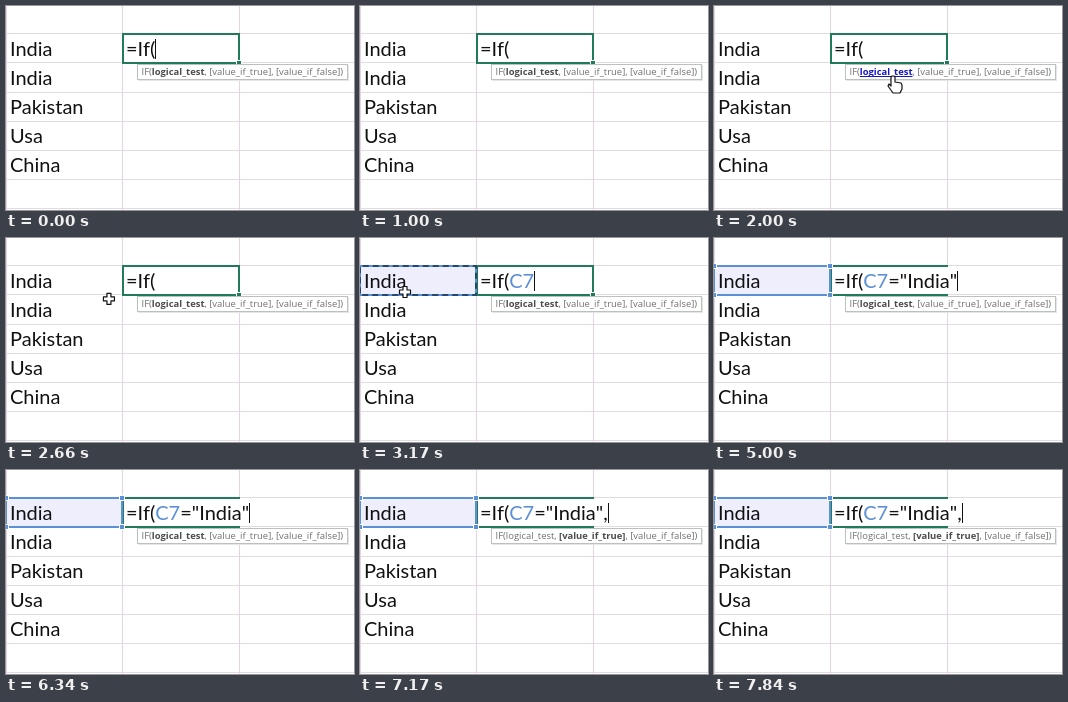
These frames come from a looping animation (348x204 px, 8000 ms). An HTML page with a canvas:

```html
<!DOCTYPE html>
<html>
<head>
<meta charset="utf-8">
<style>
html, body { margin: 0; overflow: hidden; background: #fff; }
canvas { display: block; }
</style>
</head>
<body>
<canvas id="stage" width="348" height="204"></canvas>
<script>
const g = document.getElementById('stage').getContext('2d');
const LOOP = 8000, STEP = 1000 / 6, BLINK = 530;
const CELL = '20px Lato, sans-serif';
const GREEN = '#217a5a', BLUE = '#5b8fd8';
const rows = ['India', 'India', 'Pakistan', 'Usa', 'China'];
const hintArgs = ['logical_test', '[value_if_true]', '[value_if_false]'];

// When each piece of the formula is entered
const typed = [
  [0, '=If('], [3000, 'C7'], [3500, '="'], [3667, 'Ind'],
  [3833, 'ia'], [4833, '"'], [6667, ',']
];
// Pointer path: time, x, y
const path = [[1667, 206, 98], [1900, 178, 70], [2330, 178, 70], [2950, 45, 54], [3480, 45, 54]];

function rect(x, y, w, h, color) {
  g.fillStyle = color;
  g.fillRect(x, y, w, h);
}

function text(str, x, y, font, color) {
  g.font = font;
  g.fillStyle = color;
  g.fillText(str, x, y);
  return x + g.measureText(str).width;
}

function shape(points, x, y) {
  g.beginPath();
  points.forEach(([a, b]) => g.lineTo(x + a, y + b));
  g.closePath();
  g.fillStyle = '#fff';
  g.strokeStyle = '#111';
  g.lineWidth = 1.2;
  g.lineJoin = 'round';
  g.fill();
  g.stroke();
}

function pointerAt(t) {
  for (let i = 1; i < path.length; i++) {
    const [t0, x0, y0] = path[i - 1], [t1, x1, y1] = path[i];
    if (t >= t0 && t < t1) {
      const p = (t - t0) / (t1 - t0), k = p * p * (3 - 2 * p);
      return { x: x0 + (x1 - x0) * k, y: y0 + (y1 - y0) * k };
    }
  }
  return null;
}

function drawGrid() {
  rect(0, 0, 348, 204, '#fff');
  for (let i = 0; i < 7; i++) rect(0, Math.round(27.2 + i * 29.2), 348, 1, '#e2dce2');
  for (const x of [0, 116, 233]) rect(x, 0, 1, 204, '#e6d3e6');
}

function drawReference(t) {
  rect(1, 28, 115, 28, '#eeeefc');
  g.lineWidth = 2;
  g.strokeStyle = BLUE;
  g.strokeRect(0, 28, 116, 29);
  if (t < 3500) {
    g.strokeStyle = '#24476f';
    g.setLineDash([6, 4]);
    g.lineDashOffset = -t / 60;
    g.strokeRect(0, 28, 116, 29);
    g.setLineDash([]);
  } else {
    for (const x of [-2, 114]) {
      for (const y of [26, 55]) {
        rect(x - 1, y - 1, 6, 6, '#fff');
        rect(x, y, 4, 4, BLUE);
      }
    }
  }
}

function drawFormula(t) {
  const entered = typed.filter(([at]) => at <= t + 1);
  g.font = CELL;
  const end = 120 + g.measureText(entered.map(e => e[1]).join('')).width;
  rect(117, 28, Math.max(116, end - 115), 28, '#fff');
  rect(116, 27, 118, 2, GREEN);
  rect(116, 56, 118, 2, GREEN);
  rect(116, 27, 2, 30, GREEN);
  if (end < 228) {
    rect(232, 27, 2, 30, GREEN);
    rect(230, 54, 6, 6, '#fff');
    rect(231, 55, 4, 4, GREEN);
  }
  if (t >= 2999) drawReference(t);
  let x = 120;
  for (const [, part] of entered) x = text(part, x, 50, CELL, part === 'C7' ? BLUE : '#111');
  const last = entered[entered.length - 1][0];
  if (Math.floor((t - last + 1) / BLINK) % 2 === 0) rect(Math.round(x), 33, 1, 20, '#111');
}

function drawHint(t, mouse) {
  const hover = mouse && mouse.x > 146 && mouse.x < 199 && mouse.y > 58 && mouse.y < 74;
  const active = t < 6666 ? 0 : 1;
  const font = bold => (bold ? 'bold ' : '') + '9.45px "Open Sans", sans-serif';
  const pieces = [['IF(']];
  hintArgs.forEach((arg, i) => pieces.push([arg, i === active, hover && i === 0], [i < 2 ? ', ' : ')']));

  const width = pieces.reduce((sum, [str, bold]) => {
    g.font = font(bold);
    return sum + g.measureText(str).width;
  }, 9);
  const w = Math.round(width);
  rect(132, 59, w, 16, '#e6e6e6');
  rect(131, 58, w, 16, '#b8c4b8');
  rect(132, 59, w - 2, 14, '#fff');

  let x = 135.5;
  for (const [str, bold, link] of pieces) {
    const start = x;
    x = text(str, x, 69, font(bold), link ? '#1717c4' : bold ? '#4c4c4c' : '#707070');
    if (link) rect(start, 70, x - start, 1, '#1717c4');
  }
}

function drawPointer({ x, y }) {
  if (x > 131 && x < 344 && y > 58 && y < 74) {
    shape([[0, 0], [2, 0], [3, 1], [3, 6], [9, 7], [10, 9], [10, 13], [8, 17],
      [1, 17], [-4, 10], [-3, 8], [-1, 10], [-1, 1]], x, y);
  } else {
    const a = 2, b = 5.5;
    shape([[-a, -b], [a, -b], [a, -a], [b, -a], [b, a], [a, a], [a, b], [-a, b],
      [-a, a], [-b, a], [-b, -a], [-a, -a]], x, y);
  }
}

function draw(now) {
  const t = Math.floor((now % LOOP + 8) / STEP) * STEP % LOOP;
  const mouse = pointerAt(t);
  drawGrid();
  drawFormula(t);
  rows.forEach((name, i) => text(name, 4, 50 + i * 29, CELL, '#111'));
  drawHint(t, mouse);
  if (mouse) drawPointer(mouse);
  requestAnimationFrame(draw);
}
requestAnimationFrame(draw);
</script>
</body>
</html>
```
